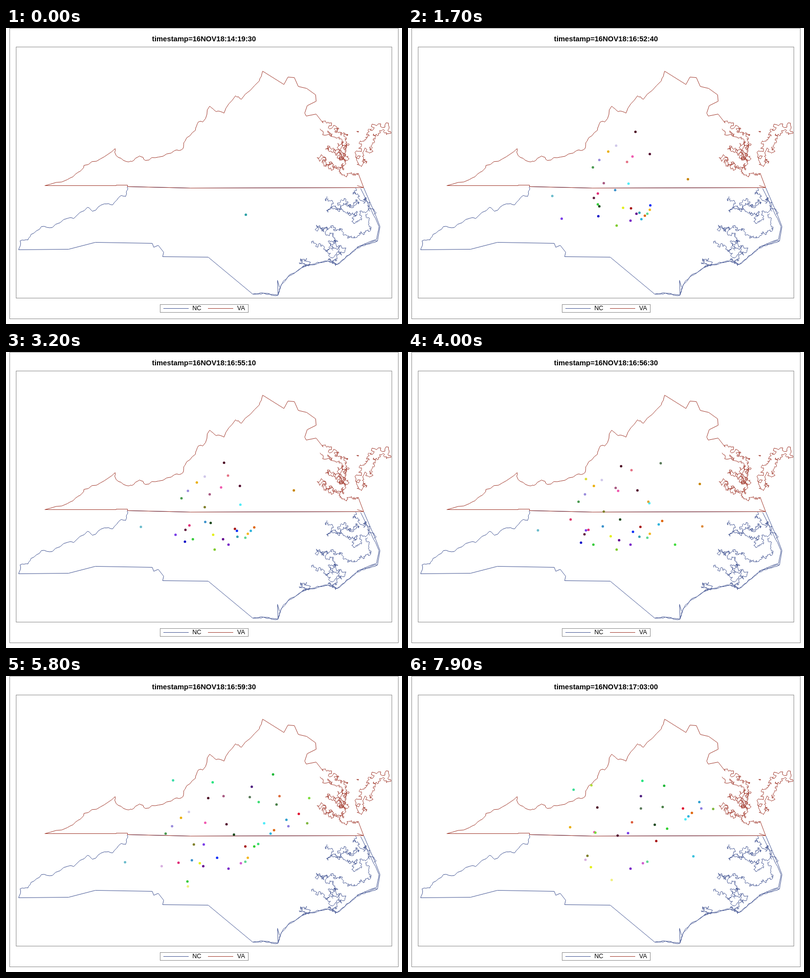
Recreate the animation shown at these times as an HTML page. Size 800 px wide and 600 px high, loop 8000 ms.

```html
<!DOCTYPE html>
<html lang="en">
<head>
<meta charset="utf-8">
<title>Flight map</title>
<style>
  html, body { margin: 0; width: 100%; height: 100%; overflow: hidden; background: #fff; }
  svg { display: block; width: 800px; height: 600px; }
  text { font-family: "Liberation Sans", Arial, sans-serif; font-size: 12.5px; fill: #000; }
  #title { font-size: 14.67px; font-weight: bold; text-anchor: middle; }
  .box { fill: none; stroke: #8c8c8c; }
  .nc { fill: none; stroke: #445694; }
  .va { fill: none; stroke: #a23a2e; }
</style>
</head>
<body>
<svg viewBox="0 0 800 600">
  <rect class="box" x="7.5" y=".5" width="785" height="589"/>
  <rect class="box" x="20.5" y="38.5" width="759" height="509"/>
  <text id="title" x="400" y="27"></text>
  <g id="map" transform="translate(.5 .5)"></g>
  <g id="dots" transform="translate(.5 .5)"></g>
  <rect class="box" x="311.5" y="560.5" width="178" height="16"/>
  <path class="nc" d="M318 568.5H369"/>
  <text x="376.5" y="572">NC</text>
  <path class="va" d="M408 568.5H459"/>
  <text x="467" y="572">VA</text>
</svg>
<script>
const STEP = 100, STEPS = 80, JUMP = 13, REF = 49;
const $ = id => document.getElementById(id);

// Seeded random numbers from 0 to 1
let seed = 7;
function rand() {
  seed = (seed * 16807) % 2147483647;
  return seed / 2147483647;
}

function add(parent, tag, attrs) {
  const el = document.createElementNS("http://www.w3.org/2000/svg", tag);
  for (const key in attrs) el.setAttribute(key, attrs[key]);
  return parent.appendChild(el);
}

// Midpoint displacement: returns the points after a, up to and including b
function rough(a, b, wobble, depth) {
  if (!depth) return [b];
  const dx = b[0] - a[0], dy = b[1] - a[1], len = Math.hypot(dx, dy);
  const push = (rand() - 0.5) * wobble * Math.min(len, 14) / len;
  const mid = [(a[0] + b[0]) / 2 - dy * push, (a[1] + b[1]) / 2 + dx * push];
  return [...rough(a, mid, wobble, depth - 1), ...rough(mid, b, wobble, depth - 1)];
}

function outline(cls, keys, wobble = 0, depth = 0) {
  const pts = keys.split(" ").map(p => p.split(",").map(Number));
  const out = [pts[0]];
  for (let i = 1; i < pts.length; i++) out.push(...rough(pts[i - 1], pts[i], wobble, depth));
  add($("map"), "polyline", { class: cls, points: out.map(p => p.map(n => n.toFixed(1))).join(" ") });
}

const ridge = (cls, keys) => outline(cls, keys, 0.35, 2);
const shore = (cls, keys) => outline(cls, keys, 1.5, 4);

// North Carolina
outline("nc", "245,321 372,324 722,323");
ridge("nc", "245,320 243,330 241,341 232,339 215,358 198,356 174,371 164,363 136,386 125,385 93,404 71,402 50,418 44,429 28,431 25,449");
outline("nc", "25,449 126,448 180,434 295,436 298,444 307,440 318,454 316,463 408,464 498,539");
for (const pass of [1, 2])
  outline("nc", "498,539 520,537 549,541 557,518 568,505 607,480 650,472 668,479 708,446 750,431", 0.25, 3);
outline("nc", "750,431 755,402 747,381 722,323");
outline("nc", "708,444 748,428 753,402 738,370 716,325", 0.1, 2);
outline("nc", "549,541 548,511 552,525");
shore("nc", "607,480 592,475 602,472 598,485");
shore("nc", "617,436 642,446 655,456 684,453 668,464 650,470 668,478");
shore("nc", "624,408 650,419 664,425 652,434 670,432 652,444 660,450");
shore("nc", "624,408 658,405 674,410 697,421 720,416 733,400 730,376");
shore("nc", "648,341 655,350 650,373 690,372 710,373 705,395 714,379 743,377");
shore("nc", "655,364 676,361 690,355 708,347 706,358 671,366");
shore("nc", "706,324 714,340 722,355 735,371");

// Virginia
outline("va", "722,323 372,324 245,321 245,318 222,318 222,319 78,319");
ridge("va", "78,319 123,307 145,292 157,278 190,265 220,244 222,258 242,270 254,270 269,259 281,268 308,261 340,248 357,244 361,229 382,207 388,190 397,190 411,158 424,169 440,172 463,137 475,144 511,107 518,87");
outline("va", "518,87 561,114 569,99 582,100 590,118 607,122 625,135 626,148 608,157 603,172 606,178 626,174 640,192");
shore("va", "640,192 660,200 672,204 690,215 684,224 688,241 670,233 660,220 634,204");
shore("va", "688,238 684,250 690,259 674,262 680,252 672,264 645,245 665,257 674,268 686,275 682,287 668,284 652,271 628,262");
shore("va", "628,262 655,270 667,284 674,294 690,298 706,298 711,294");
outline("va", "711,294 722,323 709,319");
shore("va", "773,204 740,207 726,221 718,237 710,271 714,277 722,262 738,246 744,228 756,212 773,204");
outline("va", "708,209 712,209 711,211 708,209");

const dots = [];

function plane(vx, vy, color, x, y, from = JUMP, to = STEPS) {
  dots.push({ el: add($("dots"), "circle", { r: 2.5, fill: color }), vx, vy, x, y, from, to });
}

// Planes of one stream share a velocity; positions hold at step REF
function stream(vx, vy, ...planes) {
  for (const p of planes) plane(vx, vy, ...p);
}

plane(-0.2, 0, "#2ba0a6", 474, 378, 0, JUMP);

// South-west
stream(-1.25, 0.91,
  ["#4d0f26", 419, 239], ["#eab010", 364, 279], ["#f05ab0", 413, 289],
  ["#d0c8ea", 380, 267, JUMP, 73], ["#9a8cdc", 346, 296, JUMP, 73], ["#4a9a50", 333, 311, JUMP, 73],
  ["#502080", 507, 216, 45], ["#6cbccc", 251, 369, JUMP, 45], ["#6cbccc", 251, 369, 58, 73]);
stream(-1.05, 1.1,
  ["#541030", 454, 290], ["#3c92cc", 384, 363, JUMP, 73],
  ["#5a7a5a", 501, 235, 33], ["#20b838", 548, 189, 58]);
stream(-0.85, 1.05,
  ["#80802c", 387, 332, 32], ["#e02c78", 356, 369, JUMP, 73], ["#622040", 348, 378, JUMP, 45]);
stream(-0.4, 1.43, ["#38cc3c", 370, 403, JUMP, 73]);

// West
stream(-1.52, 0.22,
  ["#640890", 412, 383, JUMP, 73], ["#1030f8", 440, 366, JUMP, 73],
  ["#1414c8", 335, 388, JUMP, 45], ["#4a8048", 560, 258, 58]);
stream(-1.05, 0.38, ["#e4f01c", 400, 376]);
stream(-1.75, -0.5, ["#e01030", 607, 283, 58]);

// North-east
stream(1.52, -1.66, ["#e06810", 527, 327], ["#30b4dc", 520, 334]);
stream(1.07, -1.73,
  ["#a85a82", 429, 259, JUMP, 73], ["#c8860a", 599, 251, JUMP, 58], ["#30d030", 491, 361, 45],
  ["#30a0d0", 556, 307, 45], ["#8c7ce0", 560, 320, 58]);
stream(0.36, -1.4, ["#e57386", 454, 226, JUMP, 58], ["#80b840", 605, 311, 58]);

// East
stream(1.8, -0.97, ["#1f4a20", 444, 330]);
stream(1.85, -0.4, ["#50ecf8", 504, 302]);
stream(2.17, -1.1, ["#7a3ee8", 379, 351]);
stream(0.82, -0.5, ["#a81818", 476, 349]);
stream(2.65, -0.17, ["#28e480", 393, 217, 45]);
stream(2.1, -0.6, ["#f0f080", 348, 431, 58], ["#d8b0e0", 295, 390, 58]);

// Waiting near the airport
stream(0, 0,
  ["#7a28c8", 449, 390], ["#60d890", 483, 376], ["#38a0b0", 467, 374, JUMP, 58],
  ["#80cc30", 421, 400, JUMP, 58], ["#f4b824", 488, 368, JUMP, 73], ["#d060d0", 474, 379, 58]);

// Brief sightings
for (const [from, to] of [[33, 45], [45, 58], [58, 73], [73, 80]])
  for (let i = 0; i < 5; i++)
    plane(rand() * 2 - 1, rand() * 2 - 1, `hsl(${rand() * 360} 70% 55%)`,
      290 + rand() * 330, 200 + rand() * 200, from, to);

const pad = n => String(Math.floor(n)).padStart(2, "0");

function clock(step) {
  const sec = step < JUMP
    ? 14 * 3600 + 19 * 60 + 30 + Math.round(step * 1.2) * 10
    : 16 * 3600 + 49 * 60 + 50 + step * 10;
  return [sec / 3600, sec / 60 % 60, sec % 60].map(pad).join(":");
}

function draw(step) {
  $("title").textContent = "timestamp=16NOV18:" + clock(step);
  for (const { el, vx, vy, x, y, from, to } of dots) {
    el.style.display = step >= from && step < to ? "" : "none";
    el.setAttribute("cx", Math.round(x + vx * (step - REF)));
    el.setAttribute("cy", Math.round(y + vy * (step - REF)));
  }
}

const start = performance.now();
let last = -1;

function tick() {
  const step = Math.floor((performance.now() - start) / STEP) % STEPS;
  if (step !== last) draw(last = step);
  requestAnimationFrame(tick);
}
tick();
</script>
</body>
</html>
```
